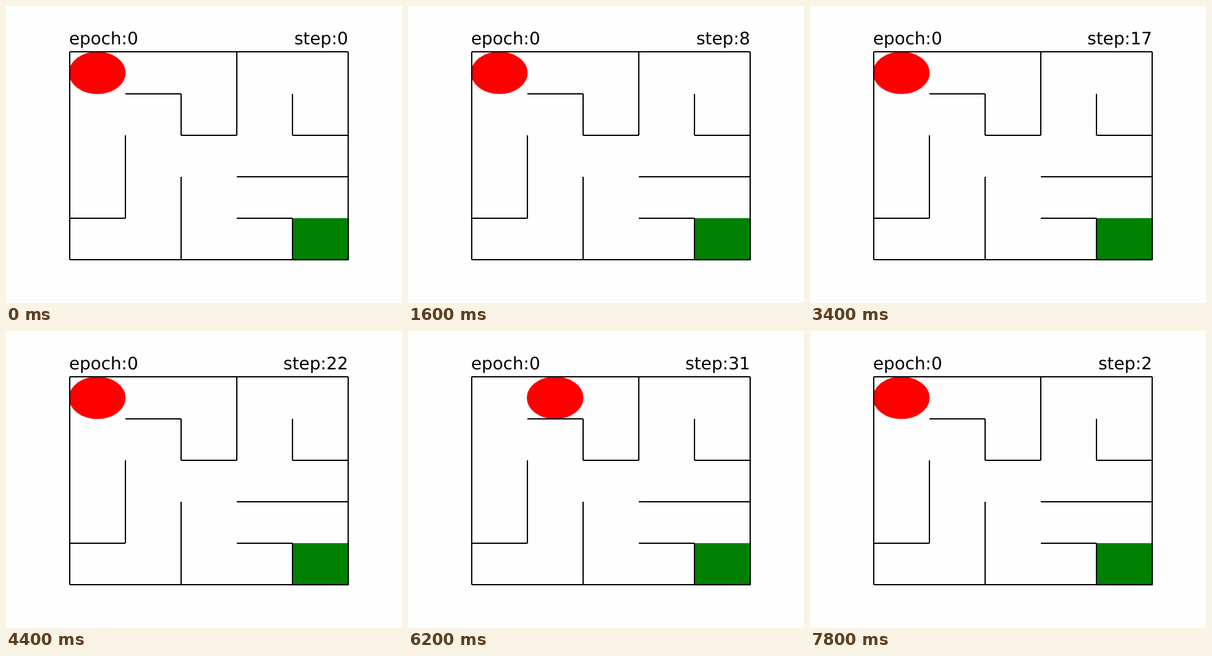
An HTML page for the animation above (8000 ms loop, 640x480 px).

```html
<!DOCTYPE html>
<html lang="en">
<head>
<meta charset="utf-8">
<title>Maze walk</title>
<style>
  html, body { margin: 0; width: 100%; height: 100%; overflow: hidden; background: #fefefe; }
  svg { display: block; width: 640px; height: 480px; }
  text { font: 27.78px "DejaVu Sans", sans-serif; text-rendering: geometricPrecision; }
  path {
    fill: none; stroke: #000; stroke-width: 2;
    vector-effect: non-scaling-stroke; shape-rendering: crispEdges;
  }
</style>
</head>
<body>
<svg viewBox="0 0 640 480">
  <rect x="462.8" y="342.8" width="91.4" height="68.4" fill="#008000"/>
  <ellipse id="agent" cx="147.6" cy="108" rx="45.8" ry="34.3" fill="#fe0000"/>
  <!-- Walls in grid units: outer frame first, then the inner walls. -->
  <path transform="translate(103 74.4) scale(90 67.2)" d="
    M0 0H5 M0 5H5 M0 0V5 M5 0V5
    M1 1H2 M2 1V2 M2 2H3 M3 0V2
    M4 1V2 M4 2H5 M1 2V4 M0 4H1
    M2 3V5 M3 3H5 M3 4H4 M4 4V5"/>
  <text x="102" y="62">epoch:0</text>
  <text id="counter" x="553" y="62" text-anchor="end"></text>
</svg>
<script>
const STEP_MS = 200, LOOP_MS = 8000, EPISODE_STEPS = 37;
const DETOUR_STEP = 9, MOVE_RIGHT_STEP = 29;
const agent = document.getElementById("agent");
const counter = document.getElementById("counter");
const start = performance.now();

function draw() {
  const elapsed = (performance.now() - start) % LOOP_MS;
  const step = Math.floor(elapsed / STEP_MS) % EPISODE_STEPS;
  const col = step >= MOVE_RIGHT_STEP ? 1 : 0;
  const row = step === DETOUR_STEP ? 1 : 0;
  agent.setAttribute("transform", `translate(${90.2 * col} ${67.2 * row})`);
  counter.textContent = `step:${step}`;
  requestAnimationFrame(draw);
}
draw();
</script>
</body>
</html>
```
